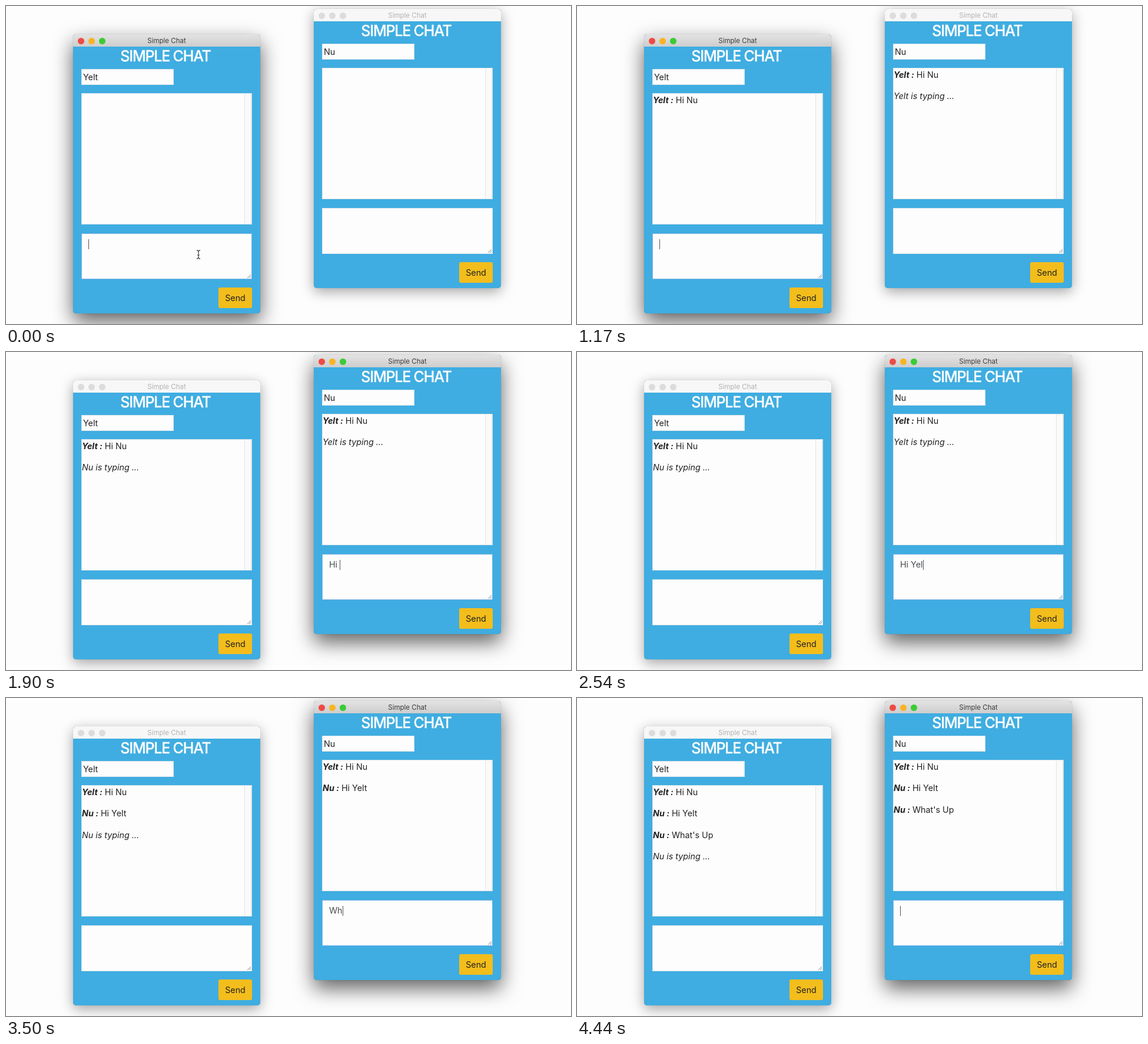
Animation of 960 by 540 pixels, one loop 4.48 s. Source, as an HTML page:

```html
<!DOCTYPE html>
<html lang="en">
<head>
<meta charset="utf-8">
<title>Simple Chat</title>
<style>
  html, body { margin: 0; width: 100%; height: 100%; overflow: hidden; background: #fdfdfd; }
  body { position: relative; font: 14.3px/20px Inter, "Open Sans", sans-serif; font-optical-sizing: none; color: #222; }
  .win, .win > * { position: absolute; box-sizing: border-box; }
  .win {
    width: 318px; height: 474px; border-radius: 5px; background: #3fade1;
    box-shadow: 0 0 1px rgba(0, 0, 0, .3), 0 6px 22px rgba(0, 0, 0, .36);
  }
  .win.active { box-shadow: 0 0 1px rgba(0, 0, 0, .4), 0 14px 34px rgba(0, 0, 0, .62); }
  .bar {
    left: 0; top: 0; width: 100%; height: 21px; border-radius: 5px 5px 0 0; background: #f7f7f7;
    font-size: 11.5px; line-height: 22px; text-align: center; color: #b2b2b2;
  }
  .active .bar { background: linear-gradient(#e3e3e3, #cdcdcd); color: #3c3c3c; }
  .dot { top: 6px; width: 11px; height: 11px; border-radius: 50%; background: #dcdcdc; }
  .active .dot { background: var(--c); }
  .head {
    left: -2px; top: 22px; width: 100%; font-size: 25px; line-height: 30px; font-weight: 500;
    letter-spacing: -1.2px; text-align: center; color: #fdfdfd; -webkit-text-stroke: .3px;
  }
  .name, .log, .draft { left: 14px; background: #fdfdfd; border: 1px solid #dfe6ea; white-space: pre; }
  .name { top: 59px; width: 157px; height: 27px; padding-left: 2px; line-height: 25px; }
  .log { top: 100px; width: 290px; height: 223px; line-height: 22px; }
  .log div { height: 36.3px; }
  .log::after {
    content: ""; position: absolute; right: 0; top: 0; width: 12px; height: 100%;
    box-sizing: border-box; border: solid #e4e4e4; border-width: 0 1px; background: #fafafa;
  }
  .log b, .log i { font-style: italic; }
  .draft { top: 338px; width: 290px; height: 78px; padding: 7px 11px; color: #484c50; }
  .active .draft { border-color: #7fb4e6; }
  .caret { display: none; width: 1px; height: 17px; margin-right: -1px; background: #555; vertical-align: -4px; }
  .active .caret { display: inline-block; }
  .grip { left: 295px; top: 407px; width: 8px; height: 8px; stroke: #8c8c8c; }
  .send {
    left: 247px; top: 430px; width: 57px; height: 35px; border-radius: 3px;
    background: #f3bd1c; line-height: 35px; text-align: center;
  }
  #beam { position: absolute; left: 322px; top: 414px; fill: none; stroke: #444; stroke-width: 1.3; }
</style>
</head>
<body>
<svg id="beam" width="10" height="16"><path d="M2 1Q5 1 5 3Q5 1 8 1M5 3V13M2 15Q5 15 5 13Q5 15 8 15M3.5 9H6.5"/></svg>
<script>
const LOOP = 4480;
const SWITCH = 1450;
const LEFT = "Yelt", RIGHT = "Nu";

// Each message: author, text, time of every keystroke, time it is sent.
const messages = [
  { from: LEFT, text: "Hi " + RIGHT, keys: [260, 390, 510, 710, 840], sent: 1000 },
  { from: RIGHT, text: "Hi " + LEFT, keys: [1610, 1730, 1840, 2070, 2230, 2400, 2640], sent: 2840 },
  { from: RIGHT, text: "What's Up", keys: [3240, 3410, 3570, 3680, 3800, 3910, 4000, 4130, 4240], sent: 4370 }
];

function makeWindow(user, x, y) {
  const el = document.createElement("div");
  el.className = "win";
  el.style.left = x + "px";
  el.style.top = y + "px";
  const dots = ["#ee4b45", "#f8b424", "#3bcb35"]
    .map((c, i) => `<div class="dot" style="left:${8 + 18 * i}px;--c:${c}"></div>`).join("");
  el.innerHTML = `<div class="bar">Simple Chat</div>${dots}
    <div class="head">SIMPLE CHAT</div>
    <div class="name">${user}</div>
    <div class="log"></div>
    <div class="draft"><span class="text"></span><span class="caret"></span></div>
    <svg class="grip"><path d="M1 7L7 1M4 7L7 4"/></svg>
    <div class="send">Send</div>`;
  document.body.prepend(el);
  return { user, el, log: el.querySelector(".log"), text: el.querySelector(".text"), html: "" };
}

const windows = [makeWindow(LEFT, 114, 48), makeWindow(RIGHT, 523, 5)];

function draftOf(user, t) {
  const m = messages.find(m => m.from === user && t >= m.keys[0] && t < m.sent);
  return m ? m.text.slice(0, m.keys.filter(k => k <= t).length) : "";
}

function logOf(user, t) {
  const sent = messages.filter(m => m.sent <= t);
  const lines = sent.map(m => `<div><b>${m.from} :</b> ${m.text}</div>`);
  // The typing note stays until this user sends something.
  const cleared = Math.max(0, ...sent.filter(m => m.from === user).map(m => m.sent));
  const typist = messages.find(m => m.from !== user && m.keys.some(k => k > cleared && k <= t));
  if (typist) lines.push(`<div><i>${typist.from} is typing ...</i></div>`);
  return lines.join("");
}

const beam = document.getElementById("beam");

function draw(t) {
  const active = t < SWITCH ? LEFT : RIGHT;
  for (const w of windows) {
    w.el.classList.toggle("active", w.user === active);
    w.text.textContent = draftOf(w.user, t);
    const html = logOf(w.user, t);
    if (html !== w.html) w.log.innerHTML = w.html = html;
  }
  // Typing hides the pointer.
  beam.style.visibility = t < messages[0].keys[0] ? "visible" : "hidden";
}

const start = performance.now();
function tick() {
  draw((performance.now() - start) % LOOP);
  requestAnimationFrame(tick);
}
tick();
</script>
</body>
</html>
```
